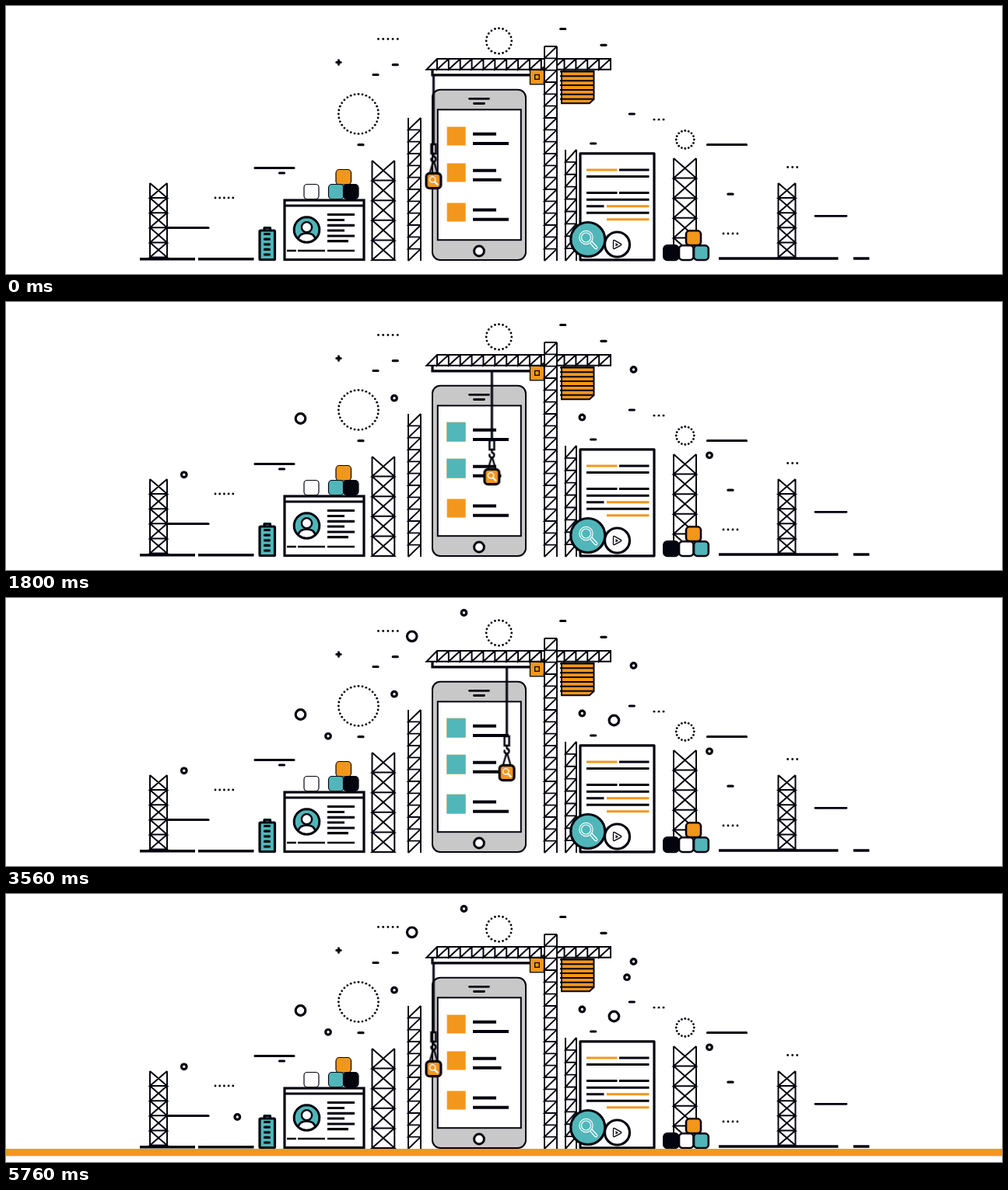
Animation of 1280x345 px, one loop 6090 ms. Source, as an HTML page:

```html
<!DOCTYPE html>
<html lang="en">
<head>
<meta charset="utf-8">
<title>App construction site</title>
<style>
html, body { margin: 0; width: 100%; height: 100%; overflow: hidden; background: #fff; }
svg { display: block; width: 100vw; height: 100vh; }
.ink { fill: none; stroke: #04040f; }
.solid { stroke: #04040f; }
.round { stroke-linecap: round; stroke-linejoin: round; }
.white { fill: #fff; }
.orange { fill: #f3971c; }
.teal { fill: #50b6b9; }
.black { fill: #04040f; }
.glyph { fill: none; stroke: #fff; stroke-linecap: round; }

/* The trolley advances in 40 ms ticks, then rests before the loop restarts. */
#hook { animation: travel 6090ms infinite; }
@keyframes travel {
  0% { transform: translateX(549.5px); animation-timing-function: steps(73, end); }
  47.9475% { transform: translateX(671px); animation-timing-function: steps(71, end); }
  94.5813%, 100% { transform: translateX(549.5px); }
}
</style>
</head>
<body>
<svg viewBox="0 0 1280 345" preserveAspectRatio="none">
  <g id="scenery"></g>

  <!-- profile card -->
  <g class="solid" stroke-width="1.2">
    <rect class="white" x="383" y="229.5" width="19" height="19" rx="4"/>
    <rect class="orange" x="424" y="210.5" width="19.5" height="19.5" rx="4.5"/>
    <rect class="teal" x="414.5" y="229.5" width="19.5" height="19" rx="4.5"/>
    <rect class="black" x="433.5" y="229.5" width="19.5" height="19" rx="4.5"/>
  </g>
  <rect class="solid white" x="358" y="250" width="102" height="76.5" stroke-width="3.2"/>
  <path class="ink" stroke-width="3" d="M358 257H460"/>
  <circle class="solid teal" cx="386.5" cy="288" r="16.3" stroke-width="3"/>
  <path class="solid white" stroke-width="2.4" d="M375.5 300Q377 292.5 386.5 292.5T397.5 300Q386.5 308 375.5 300Z"/>
  <circle class="solid white" cx="386.5" cy="284.7" r="6.6" stroke-width="2.4"/>
  <path class="ink" stroke-width="3.2" d="M413 268.5h35M413 275.5h22M413 282.3h35M413 289h22M413 296h35M413 302.7h27"/>
  <path class="ink" stroke-width="2.4" d="M361 315h12M375 315h35M413 315h35"/>

  <!-- battery -->
  <g class="solid teal" stroke-width="3.2" stroke-linejoin="round">
    <rect x="332" y="285.5" width="7.5" height="5"/>
    <rect x="326" y="289" width="19.5" height="37.5" rx="1"/>
  </g>
  <path class="ink round" stroke-width="3.2" d="M332.500 293.500h6M332.500 300.200h6M332.500 306.800h6M332.500 313.400h6M332.500 320h6"/>

  <!-- phone -->
  <rect class="solid" fill="#c8c8c8" x="548" y="107.800" width="120" height="219.200" rx="10" stroke-width="2"/>
  <rect class="solid white" x="554.800" y="133.400" width="107" height="167.800" stroke-width="2"/>
  <path class="ink round" stroke-width="2.800" d="M595.500 119.300h25M601.500 125.500h13"/>
  <circle class="solid white" cx="608" cy="315.500" r="6.400" stroke-width="3"/>
  <path class="ink" stroke-width="4" d="M600 164.700h30M600 177h46M600 211.700h30M600 223.800h36.500M600 262.500h30M600 274.700h46"/>
  <g id="tiles"></g>

  <!-- document -->
  <rect class="solid white" x="738" y="189.800" width="95" height="137" stroke-width="3.200" stroke-linejoin="round"/>
  <path class="ink" stroke-width="3" d="M788 211h38.500M746 219.500h80.500M746 240.500h39.500M788 240.500h38.500M746 249.200h80.500M746 257.800h22.500M746 266.200h80.500"/>
  <path fill="none" stroke="#f3971c" stroke-width="3" d="M746 211h39.500M772 257.800h54.500M772 274.800h54.500"/>
  <circle class="solid teal" cx="747.800" cy="300.500" r="22" stroke-width="3.200"/>
  <g class="glyph" stroke-width="1.200">
    <circle cx="745.500" cy="298" r="8.600"/>
    <circle cx="745.500" cy="298" r="6"/>
    <path d="M751 305.500l6 7q2 1 2.500-.500t-.500-2.500l-6-6.500"/>
  </g>
  <circle class="solid white" cx="785.500" cy="307" r="16" stroke-width="3.200"/>
  <path class="ink round" stroke-width="1.300" d="M780.500 302.500v9q0 1.500 1.500.800l8-4.200q1.500-1 0-2l-8-4.500q-1.500-.600-1.500.900Z"/>
  <path class="black" d="M783.500 305v4.500l3.500-2.300Z"/>

  <!-- block pile -->
  <g class="solid" stroke-width="2.600">
    <rect class="orange" x="874" y="289.300" width="19" height="18.700" rx="4.500"/>
    <rect class="black" x="845.300" y="308.300" width="19" height="18.700" rx="4.500"/>
    <rect class="white" x="865" y="308.300" width="18.500" height="18.700" rx="4.500"/>
    <rect class="teal" x="884" y="308.300" width="18.800" height="18.700" rx="4.500"/>
  </g>

  <!-- crane -->
  <path class="ink" stroke-width="3.200" d="M548 82V88.800H673"/>
  <rect class="solid orange" x="673.500" y="82" width="18" height="18.800" stroke-width="1.300"/>
  <rect class="ink" x="679.700" y="88.500" width="5.600" height="5.800" stroke-width="1.300"/>
  <path class="solid orange" stroke-width="2" d="M714 84H755.500V120L750 125.300H714Z"/>
  <path class="ink" stroke-width="2" d="M712 84.500h44M712 90.300h44M712 96.200h44M712 102h44M712 107.900h44M712 113.800h44M712 119.700h44"/>
  <g id="crane"></g>

  <g id="rings"></g>

  <g id="hook">
    <path class="ink" stroke-width="3" d="M0 89V178"/>
    <rect class="ink" x="-3" y="178" width="6" height="12" stroke-width="2.600"/>
    <path class="ink round" stroke-width="2.500" d="M0 190.500V193.500Q3.500 195 2.800 198T-1.500 200Q-3.500 198.500-3 196.500"/>
    <path class="ink" stroke-width="2.300" d="M-4.800 215L-.600 200.500H.600L4.800 215"/>
    <rect class="solid orange" x="-9.400" y="215.300" width="18.800" height="19.400" rx="4.500" stroke-width="3.200"/>
    <g class="glyph" stroke-width="1.400">
      <circle cx="-1.300" cy="223.300" r="3.700"/>
      <path d="M1.800 226.500L5 230" stroke-width="2"/>
    </g>
  </g>

  <rect id="floor" class="orange" x="0" y="328" width="1280" height="9.300"/>
</svg>

<script>
const LOOP = 6090;
const $ = id => document.getElementById(id);

function add(parent, tag, attrs) {
  const el = document.createElementNS("http://www.w3.org/2000/svg", tag);
  for (const key in attrs) el.setAttribute(key, attrs[key]);
  parent.appendChild(el);
  return el;
}

function line(parent, d, width, cls = "ink") {
  return add(parent, "path", { class: cls, d, "stroke-width": width });
}

// Visible only from `on` to `off`, with hard switches.
function show(el, on, off = LOOP) {
  const a = on / LOOP, b = off / LOOP;
  const frames = [
    { opacity: 0, offset: 0 }, { opacity: 0, offset: a },
    { opacity: 1, offset: a }, { opacity: 1, offset: b }
  ];
  if (b < 1) frames.push({ opacity: 0, offset: b }, { opacity: 0, offset: 1 });
  el.animate(frames, { duration: LOOP, iterations: Infinity });
}

function crossTower(x, y, w, h, cells = 5) {
  const step = h / cells;
  let d = `M${x} ${y}v${h}M${x + w} ${y}v${h}`;
  for (let i = 0; i < cells; i++) {
    const top = y + i * step;
    d += `M${x} ${top}l${w} ${step}h${-w}l${w} ${-step}`;
  }
  line($("scenery"), d, 2);
}

function slantTower(parent, x, y, w, h, cells) {
  const step = h / cells;
  let d = `M${x} ${y}v${h}M${x + w} ${y}v${h}`;
  for (let i = 1; i <= cells; i++) {
    d += `M${x + w} ${y + (i - 1) * step}l${-w} ${step}`;
    if (i < cells) d += `h${w}`;
  }
  line(parent, d, 1.9);
}

function dots(x, y, count, gap) {
  for (let i = 0; i < count; i++)
    add($("scenery"), "circle", { class: "black", cx: x + i * gap, cy: y, r: 1.4 });
}

function dotRing(cx, cy, r, count) {
  for (let i = 0; i < count; i++) {
    const a = i / count * 2 * Math.PI;
    add($("scenery"), "circle", {
      class: "black", cx: cx + r * Math.cos(a), cy: cy + r * Math.sin(a), r: 1.4
    });
  }
}

const scenery = $("scenery"), crane = $("crane");

crossTower(185, 228, 22, 95.5);
crossTower(470.5, 199, 28.8, 128);
crossTower(858, 196, 29, 128);
crossTower(992.5, 228, 22, 95.5);
slantTower(scenery, 517, 144, 16, 184, 12);
slantTower(scenery, 719, 185, 14, 143, 9);

line(scenery, "M172 325.800H243M247 325.800H318.500M916 325H1069.500M1089 325H1109.500", 3.5);
line(scenery, "M209 285.500H260M320 208.500H370M901.500 178.500H951.500", 3.2, "ink round");
line(scenery, "M1040 270.300H1080", 2.7, "ink round");
line(scenery, "M424.800 72.500h5.400M427.500 69.800v5.400", 3, "ink round");

for (const [x, y] of [[354.5, 215], [456, 178.700], [475, 88.500], [500.300, 75.700], [715.700, 29.500],
                      [768, 50.300], [804.300, 139], [754.700, 177], [931, 242.200]])
  line(scenery, `M${x - 3} ${y}h6`, 3.2, "ink round");

dots(269, 247, 5, 5.7);
dots(478.5, 42.5, 5, 6.2);
dots(833, 146.2, 3, 6);
dots(1004.7, 207.5, 3, 6);
dots(922, 293, 4, 6);
dotRing(453, 139, 25.6, 32);
dotRing(633.5, 45, 16.3, 20);
dotRing(872.8, 172, 11.5, 16);

// Boom first, so the mast covers it where they cross.
const bay = (777 - 554) / 15;
let boom = "M540.500 81.700L554 68H777V81.700Z";
for (let i = 0; i < 15; i++)
  boom += `M${554 + i * bay} 68v13.700l${bay} -13.700`;
line(crane, boom, 2);
add(crane, "rect", { class: "white", x: 692, y: 52, width: 16, height: 276 });
line(crane, "M692 52h16", 2);
slantTower(crane, 692, 52, 16, 276, 18);

// Tile: top, turns teal at, turns back at
for (const [y, on, off] of [[155.5, 600, 5480], [202.5, 1400, 4920], [253.5, 2000, 4600]]) {
  add($("tiles"), "rect", { class: "orange", x: 566.7, y, width: 24, height: 24 });
  const teal = add($("tiles"), "rect", {
    class: "teal", x: 566.4, y: y - .6, width: 24, height: 24.6, stroke: "#b9b36a", "stroke-width": .6
  });
  show(teal, on, off);
}

// Ring: centre, radius, appears at
for (const [cx, cy, r, on] of [
  [806.5, 87, 3.3, 360], [378.5, 150, 6.3, 600], [228.8, 222.3, 3.3, 840], [904, 197.3, 3.3, 1080],
  [499, 123.7, 3.3, 1480], [740.4, 148.5, 3.3, 1800], [588.5, 19, 3.3, 2160],
  [414, 177.8, 3.3, 2520], [521.7, 49.3, 6.3, 2880], [781.4, 157.5, 6.3, 3240],
  [798, 107.2, 3.3, 3840], [297.3, 287, 3.3, 4680]
]) {
  const ring = add($("rings"), "circle", { class: "ink", cx, cy, r, "stroke-width": 3.2 });
  show(ring, on);
}

show($("floor"), 4400);
</script>
</body>
</html>
```
